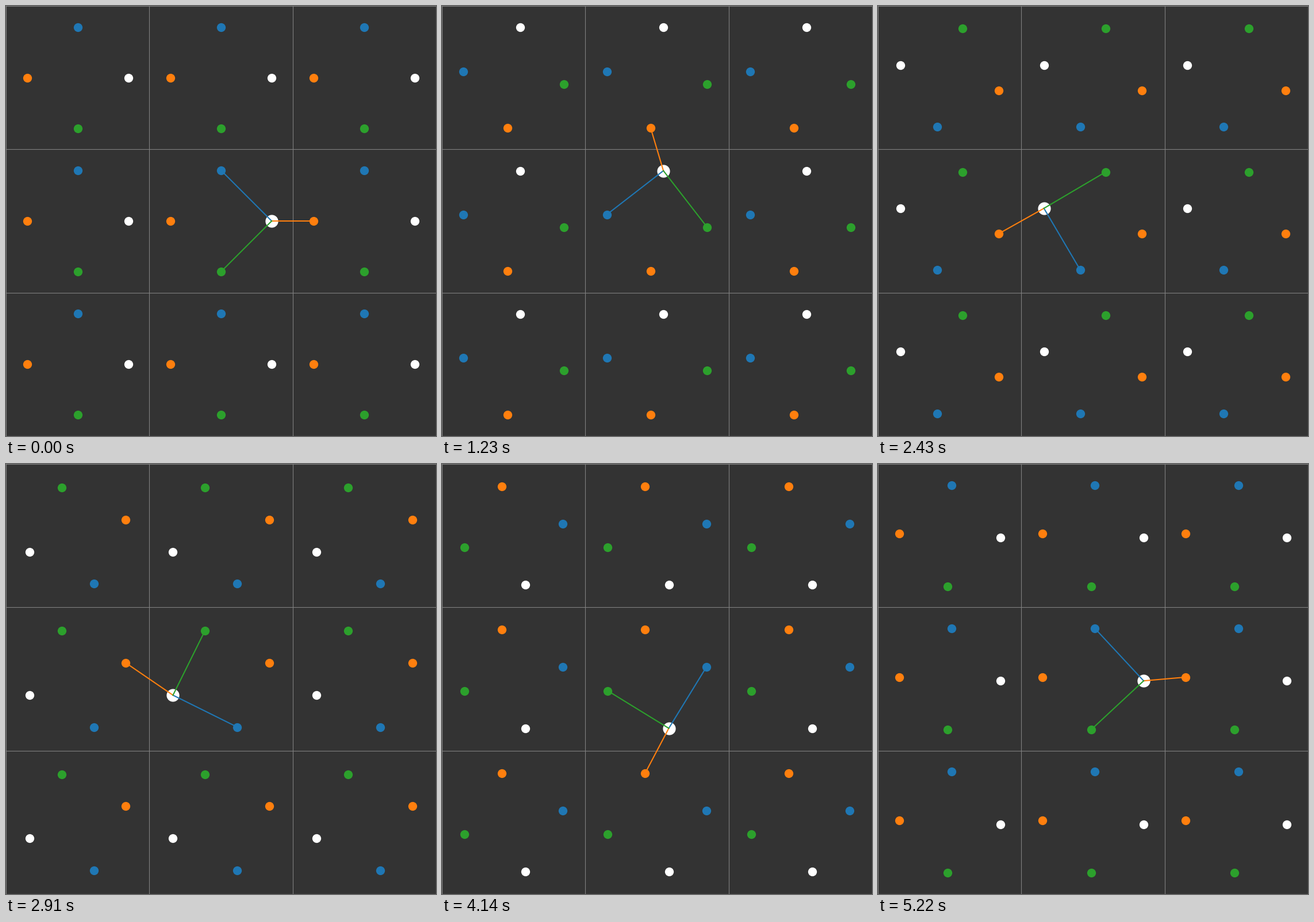
Write a matplotlib script that moves like this. It is 748 by 748 pixels and loops after 5.25 s.

```python
import matplotlib.pyplot as plt
import numpy as np
from matplotlib.animation import FuncAnimation

SIZE, DPI = 748, 100
FRAMES, INTERVAL = 175, 30
CELL = np.sqrt(8)  # cell width for a unit orbit
COLORS = ["white", "tab:blue", "tab:orange", "tab:green"]

fig = plt.figure(figsize=(SIZE / DPI, SIZE / DPI), dpi=DPI, facecolor="#333333")
ax = fig.add_axes([0, 0, 1, 1])
ax.set(xlim=(-1.5 * CELL, 1.5 * CELL), ylim=(-1.5 * CELL, 1.5 * CELL))
ax.axis("off")

for edge in CELL * np.arange(-1.5, 2):
    ax.axvline(edge, color="gray", lw=0.8, zorder=0)
    ax.axhline(edge, color="gray", lw=0.8, zorder=0)

shift = CELL * np.array([(i, j) for j in (-1, 0, 1) for i in (-1, 0, 1)])
dots = [ax.plot([], [], "o", color=c, ms=10, zorder=2)[0] for c in COLORS]
hub, = ax.plot([], [], "o", color="white", ms=15, zorder=3)
links = [ax.plot([], [], color=c, lw=1.5, zorder=4)[0] for c in COLORS[1:]]


def update(i):
    # the starting pose is held for two frames
    turn = 2 * np.pi * max(i - 1, 0) / (FRAMES - 1)
    angles = turn + np.arange(4) * np.pi / 2
    pos = np.column_stack([np.cos(angles), np.sin(angles)])

    for dot, p in zip(dots, pos):
        dot.set_data(*(p + shift).T)
    hub.set_data(*pos[:1].T)

    # join the hub to the nearest periodic image of each neighbour
    for link, p in zip(links, pos[1:]):
        d = p - pos[0]
        d -= CELL * np.round(d / CELL)
        link.set_data(*np.column_stack([pos[0], pos[0] + d]))
    return [*dots, hub, *links]


anim = FuncAnimation(fig, update, frames=FRAMES, interval=INTERVAL, repeat=True,
                     repeat_delay=0)
plt.show()
```
